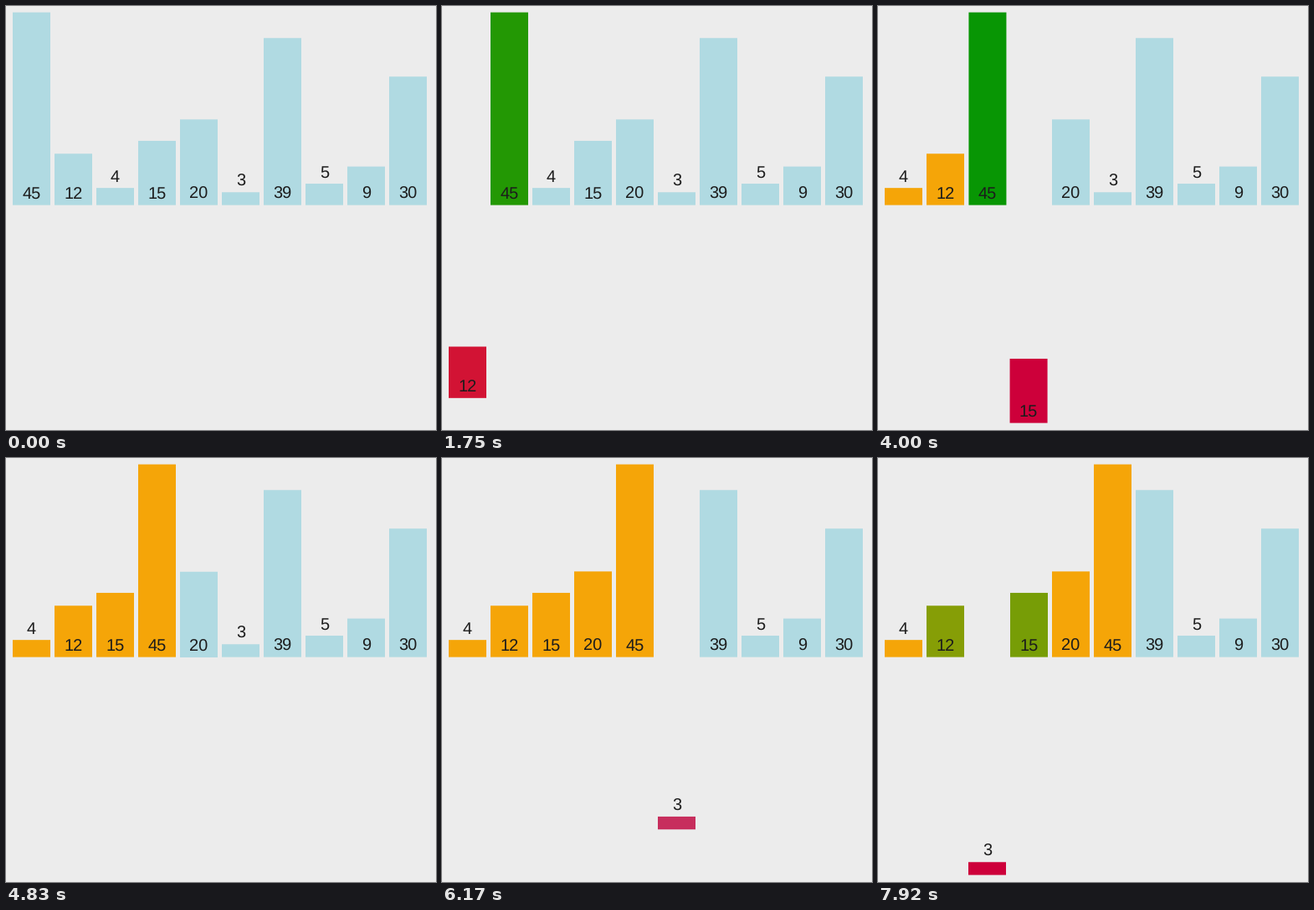
Recreate the animation shown at these times as a matplotlib script. Size 514x506 px, loop 8000 ms.

```python
import matplotlib.pyplot as plt
import numpy as np
from matplotlib.animation import FuncAnimation
from matplotlib.colors import to_rgb
from matplotlib.patches import Rectangle

W, H, DPI = 514, 506, 64        # a power of two keeps the pixel size exact
LOOP, FRAMES = 8000, 96
START, STEP = 652, 255          # ms: first step, length of each step

VALUES = [45, 12, 4, 15, 20, 3, 39, 5, 9, 30]
SCALE = 230 / 45
LEFT, PITCH, BAR_W = 8, 50, 45
BASE, DROP = 237.6, 260
FONT_PX = 20
DIGIT_W = 0.556 * FONT_PX

BACK, INK = "#ececec", "#1c1c1c"
IDLE, COMPARE, KEY, SORTED = map(to_rgb, ("#b0dae2", "#089604", "#cd003a", "#f5a508"))


def sort_steps(values):
    """Rows of x, baseline, r, g, b per bar, after every insertion sort step."""
    state = np.array([[LEFT + PITCH * i, BASE, *IDLE] for i in range(len(values))])
    steps = [state.copy()]
    order = list(range(len(values)))

    def commit():
        steps.append(state.copy())

    state[0, 2:] = SORTED
    commit()
    for i in range(1, len(values)):
        key = order[i]
        state[key, 1] = BASE + DROP
        state[key, 2:] = KEY
        commit()
        for j in range(i - 1, -1, -1):
            other = order[j]
            state[order[:j] + order[j + 2:i + 1], 2:] = SORTED
            state[other, 2:] = COMPARE
            commit()
            if values[other] <= values[key]:
                break
            state[[key, other], 0] = state[[other, key], 0]
            order[j], order[j + 1] = key, other
            commit()
        state[key, 1] = BASE
        state[order[:i + 1], 2:] = SORTED
        commit()
    return steps


def ease(p):
    return 4 * p ** 3 if p < 0.5 else 1 - 4 * (1 - p) ** 3


def state_at(ms):
    pos = max(0, (ms - START) / STEP)
    i = int(pos)
    return STEPS[i] + (STEPS[i + 1] - STEPS[i]) * ease(pos - i)


STEPS = sort_steps(VALUES)

plt.rcParams["text.hinting"] = "none"
fig = plt.figure(figsize=(W / DPI, H / DPI), dpi=DPI, facecolor=BACK)
ax = fig.add_axes([0, 0, 1, 1])
ax.set(xlim=(0, W), ylim=(H, 0))
ax.axis("off")

bars, labels = [], []
for value in VALUES:
    bars.append(ax.add_patch(Rectangle((0, 0), BAR_W, value * SCALE, lw=0, snap=False)))
    labels.append(ax.text(0, 0, str(value), color=INK, family="Liberation Sans",
                          size=FONT_PX * 72 / DPI, ha="left", va="baseline"))


def draw(frame):
    for bar, label, row in zip(bars, labels, state_at(frame * LOOP / FRAMES)):
        x, base = row[:2]
        height = bar.get_height()
        bar.set_xy((x, base - height))
        bar.set_facecolor(np.clip(row[2:], 0, 1))
        # short bars carry their number on top
        text_y = base - 7.5 if height > 30 else base - height - 7
        text_x = x + (BAR_W - DIGIT_W * len(label.get_text())) / 2
        label.set_position((text_x, text_y))
    return bars + labels


anim = FuncAnimation(fig, draw, frames=FRAMES, interval=LOOP / FRAMES,
                     repeat=True, repeat_delay=0)
plt.show()
```
